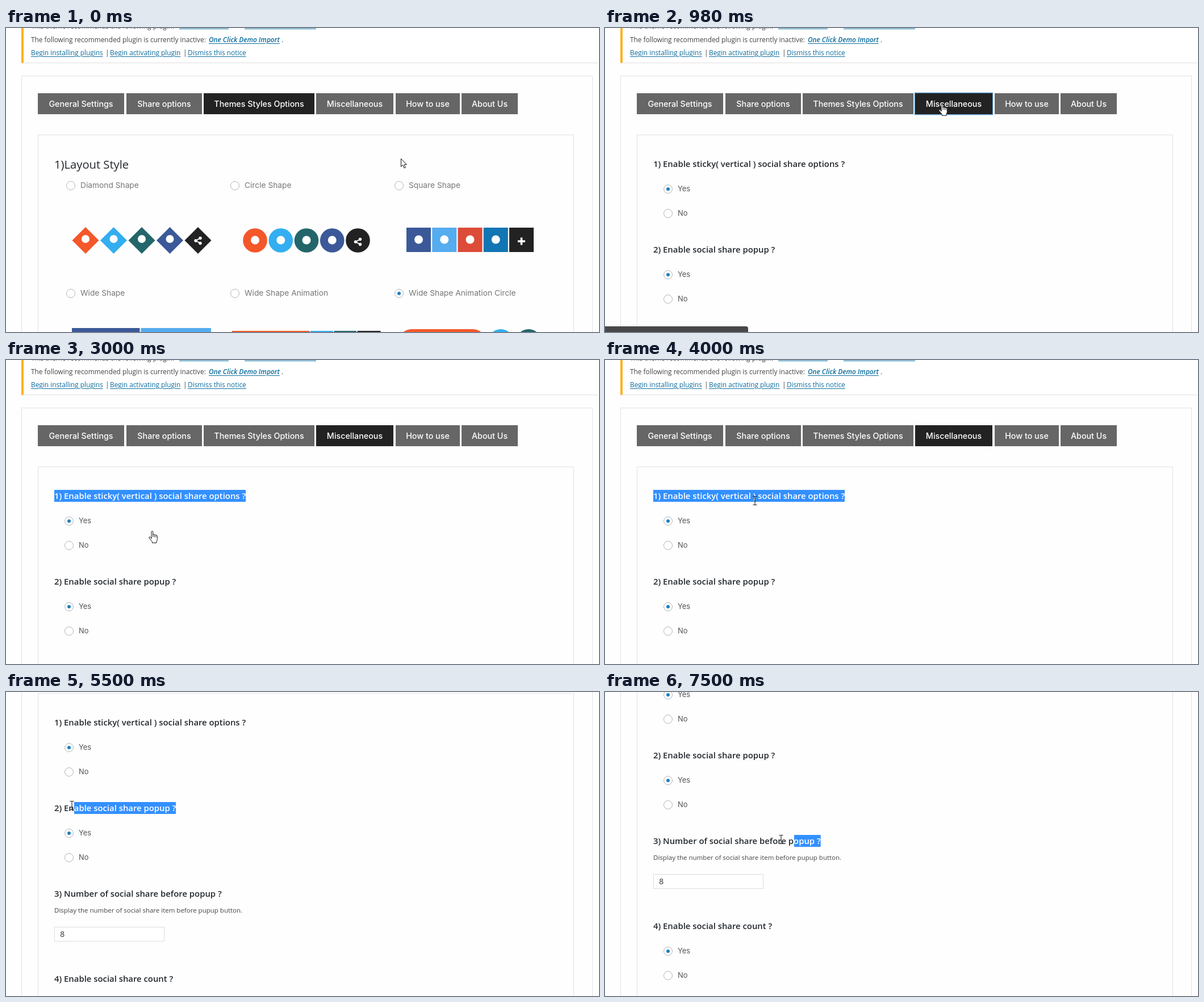
Recreate the animation shown at these times as an HTML page. Size 1044 by 536 pixels, loop 8000 ms.

```html
<!DOCTYPE html>
<html lang="en">
<head>
<meta charset="utf-8">
<title>Plugin settings</title>
<style>
html, body { margin: 0; width: 100%; height: 100%; overflow: hidden; background: #fefefe; }
#stage { position: relative; width: 1044px; height: 536px; overflow: hidden; font-family: "Open Sans", "Noto Sans", sans-serif; }
#stage *, #stage ::before, #stage ::after { position: absolute; box-sizing: border-box; margin: 0; white-space: pre; }
#page, #themes, #misc, svg { left: 0; top: 0; width: 1044px; }
#page { height: 1400px; }

.notice { left: 27px; top: -40px; width: 1015px; height: 102px; background: #fff; border-left: 4px solid #ffb11b; border-bottom: 1px solid #dedede; }
.line { height: 20px; line-height: 20px; font-size: 11.85px; font-weight: 500; color: #444; }
.link { color: #0b6c9c; text-decoration: underline; text-underline-offset: 2px; }
.name { font-style: italic; font-weight: 600; }
.rule { top: 1px; height: 1px; background: #0b6c9c; }
.box { border: 1px solid #e2e2e2; height: 1300px; }

.tab { top: 115px; height: 37px; line-height: 37px; background: #666; color: #fff; text-align: center; font: 500 14.3px/37px Inter, sans-serif; }
.opt { height: 16px; padding-left: 25px; font: 400 13.75px/15px Inter, sans-serif; color: #777; }
.opt::before { content: ""; left: 0; top: 0; width: 16px; height: 16px; border: 1px solid #b0b5b9; border-radius: 50%; background: #fff; }
.opt.on::after { content: ""; left: 5px; top: 5px; width: 6px; height: 6px; border-radius: 50%; background: #1e80be; }
#misc .opt { left: 103px; font-size: 12.9px; color: #555; }
.title { left: 85px; top: 226px; font-size: 20.2px; line-height: 28px; color: #23282d; }
.ask { left: 85px; height: 21px; line-height: 21px; font-size: 14.87px; font-weight: 600; color: #23282d; }
.ask::after { content: attr(data-text); inset: 0; background: #3390ff; color: #fff; clip-path: inset(0 0 0 100%); }
.hint { left: 85px; top: 561px; line-height: 20px; font-size: 11.5px; color: #444; }
.field { left: 85px; top: 600px; width: 194px; height: 26px; padding-left: 9px; border: 1px solid #ddd; background: #fff; font: 13.5px/24px Inter, sans-serif; color: #444; }
#status { left: 0; top: 526px; width: 252px; height: 12px; background: #484848; border-radius: 0 4px 0 0; }
#cursor { left: 0; top: 0; }
#cursor svg { width: 24px; height: 26px; overflow: visible; }

#page, #themes, #misc, #status, #cursor, #cursor svg, .now, .next, .ask::after { animation: 8s step-end infinite; }
#page { animation-name: scroll; }
#themes { animation-name: themes; }
#misc { animation-name: misc; }
#status { animation-name: status; }
#cursor { animation-name: move; }
#cursor .arrow { animation-name: arrow; }
#cursor .hand { animation-name: hand; }
#cursor .beam { animation-name: beam; }
.now { animation-name: now; }
.next { animation-name: next; }
#q1::after { animation-name: pick1; }
#q2::after { animation-name: pick2; }
#q3::after { animation-name: pick3; }

@keyframes scroll {
  0% { transform: none; }
  56.25% { transform: translateY(-186px); }
  81.25% { transform: translateY(-207px); }
  87.5%, 100% { transform: translateY(-279px); }
}
@keyframes themes { 0% { visibility: visible; } 12.25%, 100% { visibility: hidden; } }
@keyframes misc { 0% { visibility: hidden; } 12.25%, 100% { visibility: visible; } }
@keyframes now { 0% { background: #222; } 12.25%, 100% { background: #666; } }
@keyframes next {
  0% { background: #666; box-shadow: none; }
  12.25% { background: #222; box-shadow: 0 0 0 1px #5b9dd9, 0 0 2px 1px rgba(30, 140, 190, .8); }
  25%, 100% { background: #222; box-shadow: none; }
}
@keyframes status { 0% { opacity: 0; } 12.25% { opacity: 1; } 18.875% { opacity: .4; } 25%, 100% { opacity: 0; } }
@keyframes pick1 {
  0% { clip-path: inset(0 0 0 100%); }
  25% { clip-path: inset(0 0 0 253px); }
  31.5% { clip-path: inset(0 0 0 16px); }
  37.5% { clip-path: inset(0 0 0 0); }
  68.75%, 100% { clip-path: inset(0 0 0 100%); }
}
@keyframes pick2 {
  0% { clip-path: inset(0 0 0 100%); }
  68.75% { clip-path: inset(0 0 0 35px); }
  75% { clip-path: inset(0 0 0 0); }
  93.75%, 100% { clip-path: inset(0 0 0 100%); }
}
@keyframes pick3 { 0% { clip-path: inset(0 0 0 100%); } 93.75%, 100% { clip-path: inset(0 0 0 248px); } }
@keyframes move {
  0% { transform: translate(695px, 230px); }
  6.25% { transform: translate(587px, 133px); }
  18.875% { transform: translate(428px, 242px); }
  25% { transform: translate(328px, 242px); }
  31.5% { transform: translate(100px, 235px); }
  37.5% { transform: translate(251px, 301px); }
  43.75% { transform: translate(169px, 248px); }
  50% { transform: translate(264px, 248px); }
  56.25% { transform: translate(258px, 246px); }
  62.375% { transform: translate(324px, 216px); }
  68.75% { transform: translate(116px, 200px); }
  75% { transform: translate(80px, 208px); }
  81.25% { transform: translate(214px, 277px); }
  87.5% { transform: translate(378px, 267px); }
  93.75%, 100% { transform: translate(310px, 260px); }
}
@keyframes arrow { 0% { opacity: 1; } 6.25%, 100% { opacity: 0; } }
@keyframes hand {
  0% { opacity: 0; } 6.25% { opacity: 1; } 18.875% { opacity: 0; }
  37.5% { opacity: 1; } 43.75% { opacity: 0; }
  56.25% { opacity: 1; } 62.375% { opacity: 0; }
  81.25% { opacity: 1; } 87.5%, 100% { opacity: 0; }
}
@keyframes beam {
  0% { opacity: 0; } 18.875% { opacity: 1; }
  37.5% { opacity: 0; } 43.75% { opacity: 1; }
  56.25% { opacity: 0; } 62.375% { opacity: 1; }
  81.25% { opacity: 0; } 87.5%, 100% { opacity: 1; }
}
</style>
</head>
<body>
<div id="stage">
  <div id="page">
    <div class="notice"></div>
    <div class="line" style="left:44px;top:-14px">This theme recommends the following plugin:</div>
    <div class="rule" style="left:305px;width:87px"></div>
    <div class="rule" style="left:420px;width:126px"></div>
    <div class="line" style="left:44px;top:10px">The following recommended plugin is currently inactive:</div>
    <div class="line link name" style="left:357px;top:10px">One Click Demo Import</div>
    <div class="line" style="left:485px;top:10px">.</div>
    <div class="line link" style="left:44px;top:33px">Begin installing plugins</div>
    <div class="line" style="left:175px;top:33px">|</div>
    <div class="line link" style="left:183px;top:33px">Begin activating plugin</div>
    <div class="line" style="left:312px;top:33px">|</div>
    <div class="line link" style="left:320px;top:33px">Dismiss this notice</div>

    <div class="box" style="left:27px;top:84px;width:1006px"></div>
    <div class="box" style="left:56px;top:188px;width:944px"></div>
    <div class="tab" style="left:56px;width:152px">General Settings</div>
    <div class="tab" style="left:212px;width:133px">Share options</div>
    <div class="tab now" style="left:348px;width:195px">Themes Styles Options</div>
    <div class="tab next" style="left:546px;width:136px">Miscellaneous</div>
    <div class="tab" style="left:686px;width:113px">How to use</div>
    <div class="tab" style="left:802px;width:99px">About Us</div>

    <div id="themes">
      <div class="title">1)Layout Style</div>
      <div class="opt" style="left:106px;top:270px">Diamond Shape</div>
      <div class="opt" style="left:395px;top:270px">Circle Shape</div>
      <div class="opt" style="left:684px;top:270px">Square Shape</div>
      <div class="opt" style="left:106px;top:460px">Wide Shape</div>
      <div class="opt" style="left:395px;top:460px">Wide Shape Animation</div>
      <div class="opt on" style="left:684px;top:460px">Wide Shape Animation Circle</div>
      <svg id="icons" height="600" viewBox="0 0 1044 600"></svg>
    </div>

    <div id="misc">
      <div class="ask" id="q1" style="top:229px" data-text="1) Enable sticky( vertical ) social share options ?">1) Enable sticky( vertical ) social share options ?</div>
      <div class="opt on" style="top:276px">Yes</div>
      <div class="opt" style="top:319px">No</div>
      <div class="ask" id="q2" style="top:380px" data-text="2) Enable social share popup ?">2) Enable social share popup ?</div>
      <div class="opt on" style="top:427px">Yes</div>
      <div class="opt" style="top:470px">No</div>
      <div class="ask" id="q3" style="top:531px" data-text="3) Number of social share before popup ?">3) Number of social share before popup ?</div>
      <div class="hint">Display the number of social share item before pupup button.</div>
      <div class="field">8</div>
      <div class="ask" style="top:681px">4) Enable social share count ?</div>
      <div class="opt on" style="top:728px">Yes</div>
      <div class="opt" style="top:771px">No</div>
    </div>
  </div>

  <div id="status"></div>
  <div id="cursor">
    <svg class="arrow"><path d="M.5 .5V14.5L3.7 11.5L6 17L8.4 16L6 10.7H10.3Z" fill="#fff" stroke="#111"/></svg>
    <svg class="hand"><path d="M5 14V2.2Q5 .6 6.4 .6T7.8 2.2V7.2Q8.1 6.1 9.3 6.3T10.4 7.6Q10.9 6.7 11.9 7T13 8.4Q13.6 7.6 14.5 8T15.4 9.5V14.5Q15.4 17 13.9 19V21.4H6.4V19.4L1.2 13Q.4 11.7 1.4 11T3.5 11.7Z" fill="#fff" stroke="#111" stroke-linejoin="round"/><path d="M7.8 7V11M10.4 8V11.5M13 8.6V12" stroke="#111" stroke-width=".9"/></svg>
    <svg class="beam"><path d="M-3.5 -7.5H-1Q0 -7.5 0 -6.5Q0 -7.5 1 -7.5H3.5M0 -6.5V6.5M-3.5 7.5H-1Q0 7.5 0 6.5Q0 7.5 1 7.5H3.5" fill="none" stroke="#222" stroke-width="1.1"/></svg>
  </div>
</div>
<script>
const orange = '#f4572a', sky = '#33aef0', teal = '#23666a', navy = '#3b5998',
      blue = '#55acee', red = '#dd4b39', steel = '#1275b4', dark = '#222';
const rect = (x, y, w, h, fill, r = 0) =>
  `<rect x="${x}" y="${y}" width="${w}" height="${h}" rx="${r}" fill="${fill}"/>`;
const dot = (x, y, r, fill = '#fff') => `<circle cx="${x}" cy="${y}" r="${r}" fill="${fill}"/>`;
const stroke = (d, w) => `<path d="${d}" fill="none" stroke="#fff" stroke-width="${w}"/>`;
const share = (x, y) => stroke(`M${x + 4} ${y - 4.5}L${x - 4} ${y}L${x + 4} ${y + 4.5}`, 1.8) +
  dot(x + 4, y - 4.5, 2.7) + dot(x - 4, y, 2.7) + dot(x + 4, y + 4.5, 2.7);
const plus = (x, y) => stroke(`M${x - 6.5} ${y}h13M${x} ${y - 6.5}v13`, 3.6);

const social = [orange, sky, teal, navy, dark];
let art = '';
social.forEach((fill, i) => {
  const x = 140 + 49.5 * i, cx = 438.5 + 45.25 * i, last = i === 4;
  art += `<path d="M${x} 351l23.5 23.5l-23.5 23.5l-23.5 -23.5z" fill="${fill}"/>`;
  art += last ? share(x, 375) : dot(x, 372, 7);
  art += dot(cx, 374.5, 21.3, fill) + (last ? share(cx, 377) : dot(cx, 374, 7.5));
});
[navy, blue, red, steel, dark].forEach((fill, i) => {
  const x = 705 + 45.25 * i;
  art += rect(x, 352, 43, 43, fill) + (i === 4 ? plus(x + 21.5, 376) : dot(x + 21.5, 373, 7.5));
});
art += rect(116, 529, 119.5, 45, navy) + rect(237.5, 529, 123.5, 45, blue);
art += rect(398, 534, 136.5, 40, orange) + rect(536, 534, 40, 40, sky) +
       rect(577.5, 534, 39.5, 40, teal) + rect(618.5, 534, 41, 40, dark);
art += rect(691, 531, 154, 46, orange, 23) + dot(871, 554, 23, sky) + dot(920, 554, 23, teal);
document.getElementById('icons').innerHTML = art;
</script>
</body>
</html>
```
